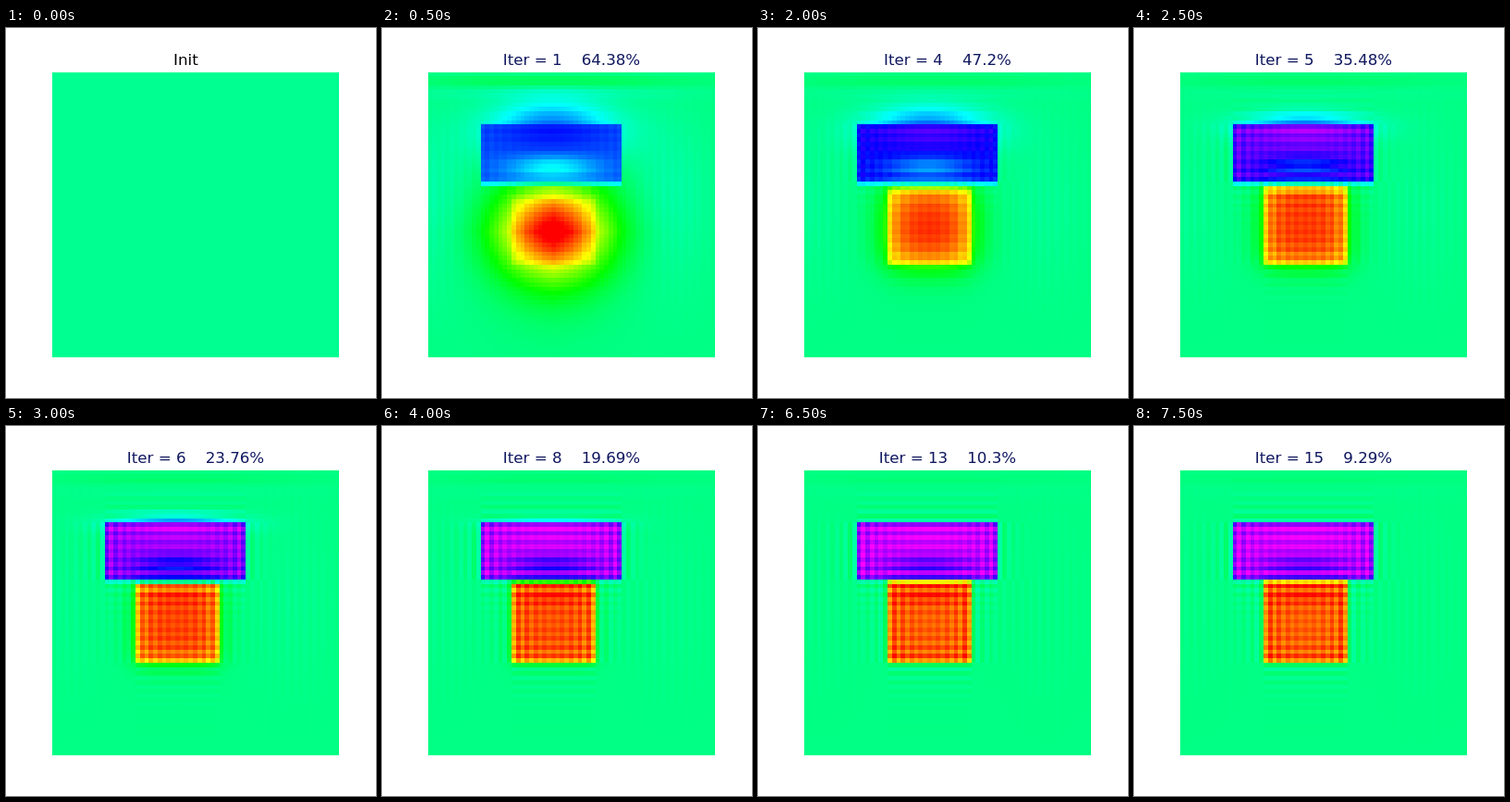
An HTML page with a canvas for the animation above (8 s loop, 400x400 px).

```html
<!DOCTYPE html>
<html lang="en">
<head>
<meta charset="utf-8">
<title>Iterative reconstruction</title>
<style>
  html, body { margin: 0; width: 100%; height: 100%; overflow: hidden; background: #fff; }
  #stage { position: relative; width: 400px; height: 400px; }
  canvas { position: absolute; left: 50px; top: 48px; }
  svg { position: absolute; left: 0; top: 0; }
  text { font: 16.67px "DejaVu Sans", sans-serif; text-anchor: middle; }
</style>
</head>
<body>
<div id="stage">
  <canvas id="field" width="310" height="308"></canvas>
  <svg width="400" height="400"><text id="title" x="205" y="40"></text></svg>
</div>
<script>
const N = 65, W = 310, H = 308, STEP = 500, STATES = 16;
const ctx = document.getElementById('field').getContext('2d');
const title = document.getElementById('title');

// Both bodies in grid cells.
const top_ = { x0: 12, x1: 44, y0: 12, y1: 25 };
const box = { x0: 19, x1: 38, y0: 25, y1: 44 };

// Known error percentages; those between are interpolated.
const errors = { 1: 64.38, 2: 57.16, 4: 47.2, 6: 23.76, 8: 19.69, 10: 11.82, 15: 9.29 };

const clamp = (v, lo, hi) => Math.min(hi, Math.max(lo, v));
const bell = (d, s) => Math.exp(-0.5 * (d / s) ** 2);
const blob = (x, y, cx, cy, sx, sy) => bell(x - cx, sx) * bell(y - cy, sy);
const span = (i, a, b) => clamp(i + 1 - a, 0, 1) * clamp(b - i, 0, 1);
const cover = (i, j, r) => span(i, r.x0, r.x1) * span(j, r.y0, r.y1);

// Plateau over [a, b] with logistic edges.
const plateau = (i, a, b, soft) =>
  1 / (1 + Math.exp((Math.abs(i + 0.5 - (a + b) / 2) - (b - a) / 2) / soft));

function errorAt(iter) {
  const marks = Object.keys(errors).map(Number);
  const hi = marks.find(m => m >= iter);
  const lo = marks.filter(m => m <= iter).pop();
  const t = hi === lo ? 0 : (iter - lo) / (hi - lo);
  return +(errors[lo] + t * (errors[hi] - errors[lo])).toFixed(2);
}

// Everything that changes from one iteration to the next.
function params(iter) {
  const fade = Math.exp(-0.28 * iter);
  const blur = 1 / (1 + (iter / 4.6) ** 6);
  const halo = 260 * fade;
  return {
    fade, blur, halo,
    haloSoft: 0.5 + 5 * fade,
    boxDepth: Math.max(15, 128 + 150 * Math.exp(-iter) - 0.85 * halo),
    boxNow: { ...box, y0: box.y0 + 5 * fade },
    topDepth: 130 - 62 * blur,
    topNow: { ...top_, y1: top_.y1 + 0.5 * blur },
    glow: 70 * Math.exp(-((iter / 8) ** 4)),
    dip: 40 * Math.exp(-iter / 25),
    ring: 2 + 11 * (1 - blur),
    band: 3 + 14 * fade
  };
}

// Alternating fringes on both sides of the edges of [a, b).
function ripple(i, a, b) {
  const inside = i >= a && i < b;
  const d = inside ? Math.min(i - a, b - 1 - i) : (i < a ? a - 1 - i : i - b);
  const sign = d % 2 ? 1 : -1;
  return inside ? sign * Math.exp(-d / 5) : -0.6 * sign * Math.exp(-d / 3.5);
}

function fringes(i, j, r) {
  const inX = i >= r.x0 && i < r.x1, inY = j >= r.y0 && j < r.y1;
  return (inY ? ripple(i, r.x0, r.x1) : 0) + (inX ? ripple(j, r.y0, r.y1) : 0);
}

function hue(i, j, p) {
  const x = 50 + (i + 0.5) * W / N, y = 48 + (j + 0.5) * H / N;
  const inTop = cover(i, j, p.topNow), inBox = cover(i, j, p.boxNow);
  const sharp = 1 - p.blur;

  const lobes = 10 * sharp * blob(x, y, 185, 128, 65, 20);
  const dip = p.dip * blob(x, y, 185, 151, 32, 9);
  const dome = p.glow * blob(x, y, 185, 105 + 7 * p.blur, 45, 4 + 18 * p.blur);
  const cap = 12 * sharp * blob(x, y, 185, 184, 38, 7);
  const halo = p.halo * plateau(i, box.x0, box.x1, p.haloSoft)
    * plateau(j, p.boxNow.y0, box.y1, p.haloSoft);
  const wave = Math.cos((y - 58) / 5) * blob(x, y, 185, 58, 100, 12);
  const side = bell(Math.abs(x - 185) - 125, 30) * bell(y - 190, 60);

  const h = 151
    + inTop * (p.topDepth + lobes - dip) + dome * (1 - 0.75 * inTop)
    - inBox * (p.boxDepth + cap) - halo * (1 - 0.8 * inTop)
    + p.ring * (fringes(i, j, top_) - fringes(i, j, box))
    - p.band * wave
    + side * (12 * p.fade + (i % 2 ? 1.6 : -1.6));
  return clamp(h, 0, 300);
}

// Pixel where a grid line falls; the grid sits slightly up and left.
const line = (i, size) => i === N ? size : Math.max(0, Math.round(i * size / N - 0.6));

function draw(iter) {
  const label = iter ? `Iter = ${iter}    ${errorAt(iter)}%` : 'Init    ';
  title.textContent = label.replace(/ /g, '\u00a0');
  title.setAttribute('fill', iter ? '#101860' : '#000');
  ctx.fillStyle = '#00ff91';
  ctx.fillRect(0, 0, W, H);
  if (!iter) return;
  const p = params(iter);
  for (let j = 0; j < N; j++) {
    const y = line(j, H);
    for (let i = 0; i < N; i++) {
      const x = line(i, W);
      ctx.fillStyle = `hsl(${hue(i, j, p).toFixed(1)}, 100%, 50%)`;
      ctx.fillRect(x, y, line(i + 1, W) - x, line(j + 1, H) - y);
    }
  }
}

let shown = -1;
function tick() {
  const iter = Math.floor(performance.now() / STEP) % STATES;
  if (iter !== shown) draw(shown = iter);
  requestAnimationFrame(tick);
}
tick();
</script>
</body>
</html>
```
